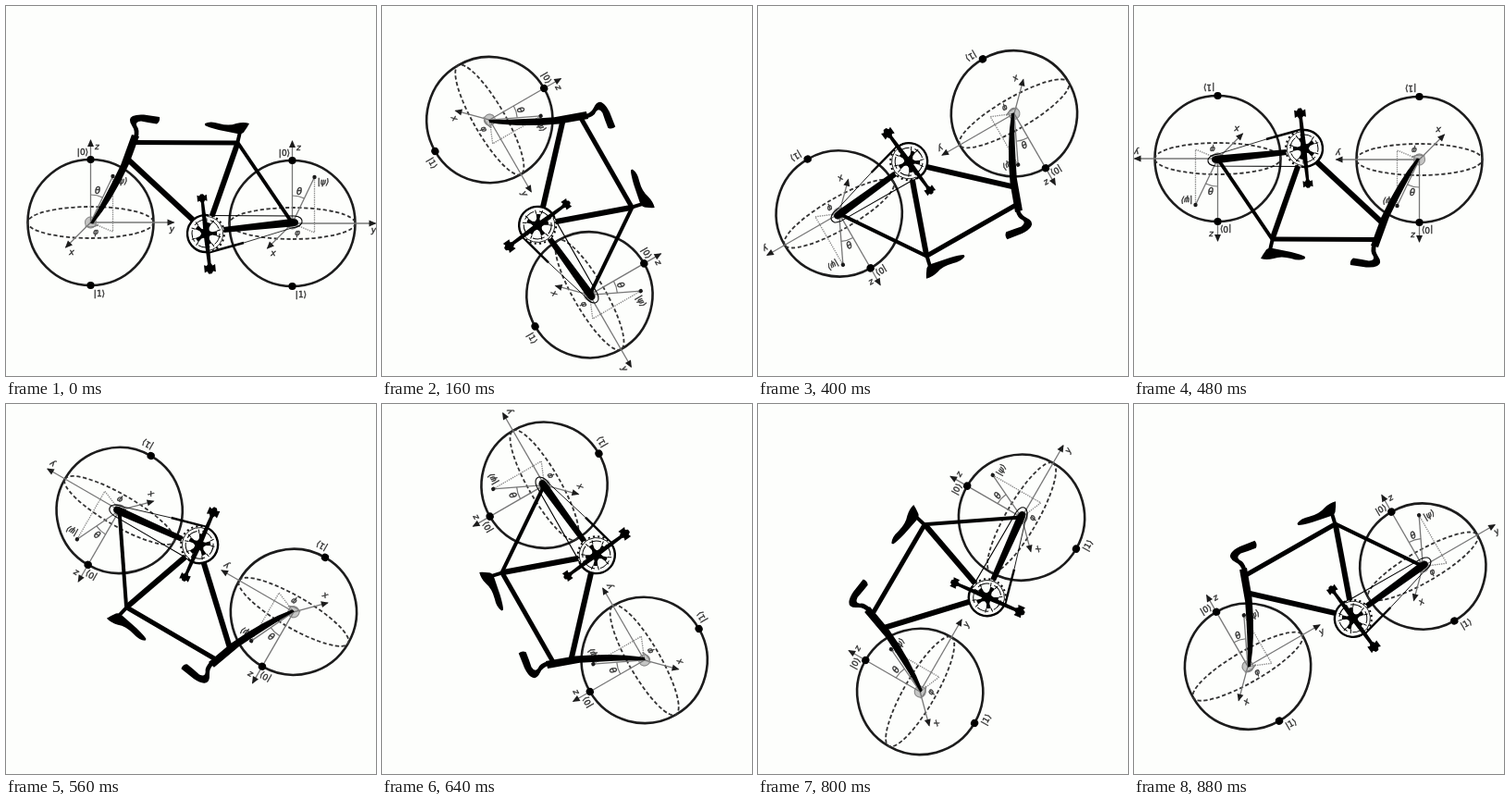
These frames come from a looping animation (400x400 px, 960 ms). An HTML page with a canvas:

```html
<!DOCTYPE html>
<html lang="en">
<head>
<meta charset="utf-8">
<title>Bloch sphere bicycle</title>
<style>
  html, body { margin: 0; width: 100%; height: 100%; overflow: hidden; background: #fdfefc; }
  canvas { display: block; }
</style>
</head>
<body>
<canvas id="stage" width="400" height="400"></canvas>
<script>
const SIZE = 400, STEP_MS = 80, STEPS = 12;
const PAPER = '#fdfefc', BLACK = '#000', INK = '#1c1c1c', GRAY = '#777';
const ctx = document.getElementById('stage').getContext('2d');

function stroke(path, width, color = BLACK, dash = []) {
  ctx.strokeStyle = color;
  ctx.lineWidth = width;
  ctx.setLineDash(dash);
  ctx.stroke(typeof path === 'string' ? new Path2D(path) : path);
  ctx.setLineDash([]);
}

function fill(path, color = BLACK) {
  ctx.fillStyle = color;
  ctx.fill(typeof path === 'string' ? new Path2D(path) : path);
}

function arc(x, y, rx, ry = rx, from = 0, to = 2 * Math.PI) {
  const path = new Path2D();
  path.ellipse(x, y, rx, ry, 0, from, to);
  return path;
}

function at(x, y, angle, draw) {
  ctx.save();
  ctx.translate(x, y);
  ctx.rotate(angle);
  draw();
  ctx.restore();
}

// Labels are centred on x; a hairline outline gives them a medium weight.
function label(text, x, y, style = '', size = 9) {
  ctx.font = `${style} ${size}px "DejaVu Sans", sans-serif`;
  ctx.textAlign = 'center';
  ctx.fillStyle = ctx.strokeStyle = '#333';
  ctx.lineWidth = 0.4;
  ctx.fillText(text, x, y);
  ctx.strokeText(text, x, y);
}

function axis(x, y) {
  stroke(`M0 0L${x} ${y}`, 1.3, GRAY);
  at(x, y, Math.atan2(y, x), () => fill('M1 0L-7 -3.5L-7 3.5Z', INK));
}

function blochSphere() {
  stroke(arc(0, 0, 68), 2.6, INK);
  stroke(arc(0, 0, 68, 17), 1.8, '#333', [4.2, 2.6]);
  axis(0, -89);
  axis(90, 0);
  axis(-27, 27);
  stroke('M0 0L24 -50', 1.3, GRAY);
  stroke('M24 -50L24 10L0 0', 1.3, '#888', [1.4, 1]);
  stroke(arc(0, 0, 30, 30, -Math.PI / 2, -1.12), 1.2, GRAY);
  stroke(arc(0, 0, 9, 5, 0.4, 2.3), 1.2, GRAY);
  fill(arc(24, -50, 2.2), INK);
  fill(arc(0, -68, 4.1));
  fill(arc(0, 68, 4.1));
  label('z', 6.8, -79, 'italic');
  label('y', 88, 10, 'italic');
  label('x', -20.5, 35, 'italic');
  label('|0⟩', -8.5, -73);
  label('|1⟩', 9.5, 80);
  label('|ψ⟩', 33.5, -42, 'italic');
  label('θ', 7.5, -31, 'italic', 10);
  label('φ', 5.5, 13, 'italic');
  fill(arc(0, 0, 6.5), 'rgba(110,110,110,.4)');
  stroke(arc(0, 0, 6), 1, '#888');
}

function pedal(x, y, scale) {
  at(x, y, -0.1, () => {
    ctx.scale(scale, scale);
    fill('M-5.5 -4L-3 -3L-1.5 -5L1.5 -5L3 -3L5.5 -4L5.5 3.5L3 2.5L1.5 5L-1.5 5L-3 2.5L-5.5 3.5Z');
  });
}

function chainring() {
  fill(arc(0, 0, 20), PAPER);
  stroke(arc(0, 0, 20, 20, 1.45, 4.8), 2.4);
  stroke(arc(0, 0, 20, 20, -1.5, 1.5), 2, BLACK, [2, 3.2]);
  stroke(arc(0, 0, 18.6, 18.6, -1.5, 1.5), 0.8);
  stroke(arc(0, 0, 15), 1, BLACK, [13, 5.8]);
  for (let i = 0; i < 5; i++) {
    at(0, 0, -Math.PI / 2 + 0.3 + i * 2 * Math.PI / 5, () => {
      fill('M0 -4L7 -1.6L12 -2.6L12 2.6L7 1.6L0 4Z');
      stroke('M12 -2.6L16 -4M12 2.6L16 4', 1);
    });
  }
  fill(arc(0, 0, 5));
}

function drivetrain() {
  stroke('M216 226.5L312 227Q321 228 320 234Q318 239 309 240', 1.1);
  stroke('M257 256L309 240', 0.8);
  stroke('M219 266.5L257 256', 2.4);
  at(216, 246, 0, chainring);
  fill('M210.5 208L213.5 208L218.5 244L222 283L218.5 283L213.5 246Z');
  pedal(212, 208, 0.95);
  pedal(220.5, 284, 1.1);
}

function frame() {
  stroke('M137 147.5L251 148', 5);
  stroke('M132 166L204 233', 6);
  stroke('M250.5 148L222 229', 6);
  stroke('M250 147L309 234', 4);
  fill('M235 239L309 230Q316 230 316 234Q316 238 309 238.5L235 245Z');
  fill('M91 235Q107 207 124 172L136 139L144 141L133 171Q115 210 94 235.5Z');
  fill('M138 142Q140 135 136.5 130Q131 122 137 119Q141 117 149 117.5L166 120'
    + 'Q167 125 163 127.5Q153 126 146 124.5Q139 125 141.5 130Q145 134 142.5 143Z');
  fill('M215 127Q221 124 230 127Q241 130 249 127Q257 125 263 127'
    + 'Q261 131 258 135Q256 139 250 138Q240 136 230 134Q218 131 215 129Z');
  stroke('M253 136L250 149', 4);
}

function bicycle() {
  at(91.5, 234, 0, blochSphere);
  at(309.5, 235, 0, blochSphere);
  frame();
  drivetrain();
}

function render(now) {
  const step = Math.floor(now / STEP_MS) % STEPS;
  ctx.fillStyle = PAPER;
  ctx.fillRect(0, 0, SIZE, SIZE);
  at(SIZE / 2, SIZE / 2, step * 2 * Math.PI / STEPS, () => {
    ctx.translate(-SIZE / 2, -SIZE / 2);
    ctx.beginPath();
    ctx.rect(0, 0, SIZE, SIZE);
    ctx.clip();
    bicycle();
  });
  requestAnimationFrame(render);
}

render(0);
</script>
</body>
</html>
```
